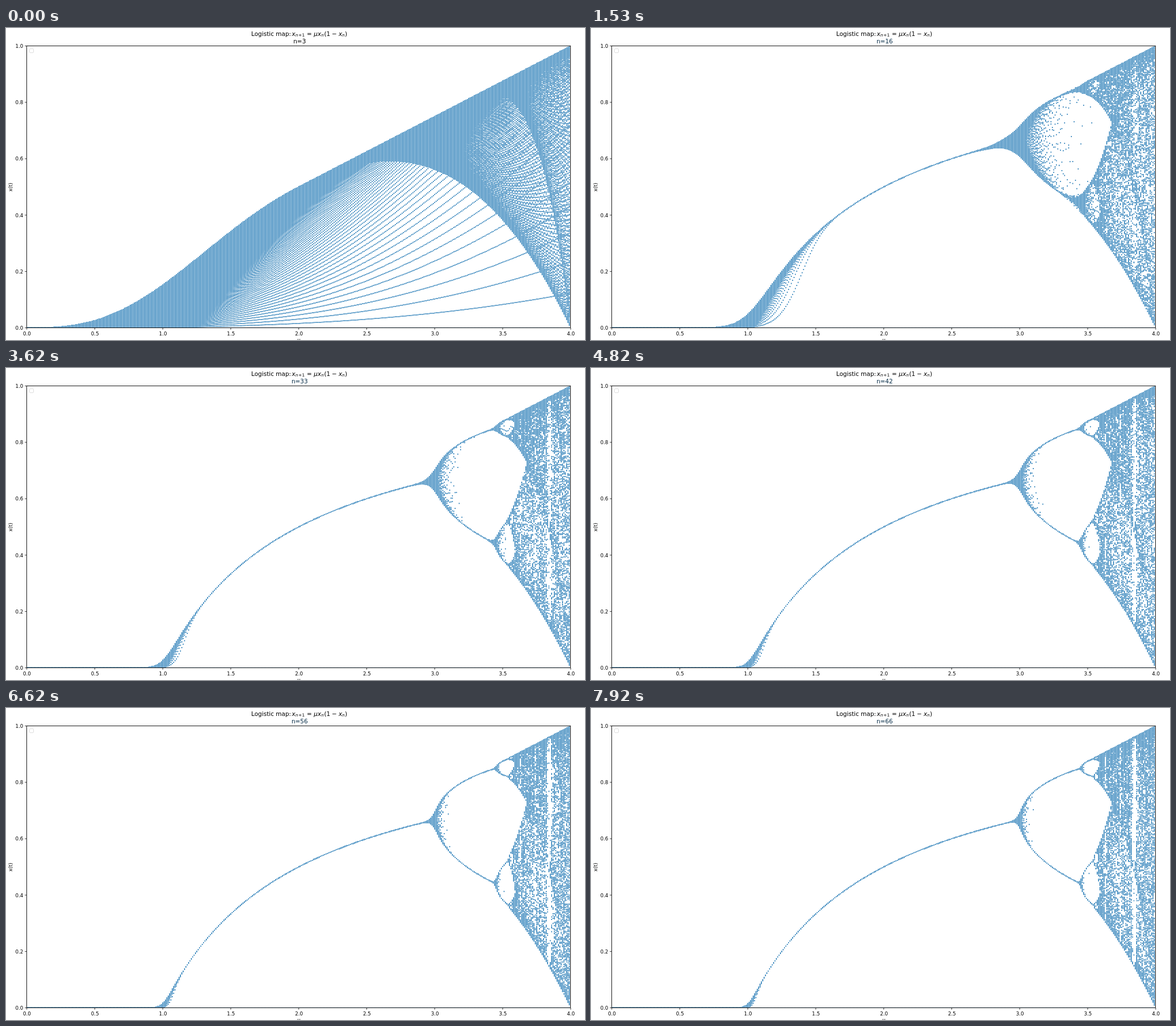
These frames come from a looping animation (1020 by 549 pixels, 8000 ms). An HTML page with a canvas:

```html
<!DOCTYPE html>
<html lang="en">
<head>
<meta charset="utf-8">
<title>Logistic map</title>
<style>
  html, body { margin: 0; width: 1020px; height: 549px; overflow: hidden; background: #fff; }
  canvas, svg { position: absolute; left: 0; top: 0; }
  text { font-family: "DejaVu Sans", sans-serif; font-size: 8.7px; }
  .title { font-size: 10.5px; }
  .it { font-style: oblique; }
  .sub { font-size: 7.4px; }
</style>
</head>
<body>
<canvas id="plot" width="1020" height="549"></canvas>
<svg id="axes" width="1020" height="549" viewBox="0 0 1020 549">
  <rect x="36.5" y="31.5" width="958" height="496" fill="none" stroke="#000" stroke-width=".9"/>
  <rect x="41.5" y="36.5" width="7" height="7" rx="1.5" fill="#fff" fill-opacity=".8" stroke="#d6d6d6" stroke-width=".8"/>
</svg>
<script>
const W = 1020, H = 549, LOOP = 8000;
const LEFT = 36.7, RIGHT = 994.8, TOP = 31.6, BOTTOM = 527.6;
const MUS = 400, SEEDS = 500, HALF = 0.75;
const svg = document.getElementById('axes');
const ctx = document.getElementById('plot').getContext('2d');

// Axis furniture and labels
function add(tag, attrs, content = '') {
  const el = document.createElementNS('http://www.w3.org/2000/svg', tag);
  for (const key in attrs) el.setAttribute(key, attrs[key]);
  el.textContent = content;
  svg.appendChild(el);
  return el;
}
const label = (x, y, content, anchor = 'start', cls = '') =>
  add('text', { x, y, 'text-anchor': anchor, class: cls }, content);
const tick = d => add('path', { d, stroke: '#000', 'stroke-width': 0.8 });

for (let i = 0; i <= 8; i++) {
  const x = LEFT + (RIGHT - LEFT) * i / 8;
  tick(`M${x} 528v2.8`);
  label(x + 0.3, 541.2, (i / 2).toFixed(1), 'middle');
}
for (let i = 0; i <= 5; i++) {
  const y = BOTTOM - (BOTTOM - TOP) * i / 5;
  tick(`M36 ${y}h-2.8`);
  label(30.3, y + 3.4, (i / 5).toFixed(1), 'end');
}
label(515.8, 552.3, 'μ', 'middle', 'it');
label(0, 0, 'x(t)', 'middle').setAttribute('transform', 'translate(11 280) rotate(-90)');

label(432, 13.7, 'Logistic map:', 'start', 'title');
const formula = [
  [503.6, 'x', 'it'], [530, '='], [542.3, 'μ', 'it'], [549, 'x', 'it'], [560.4, '('],
  [564.5, '1'], [574, '−'], [586, 'x', 'it'], [597, ')']
];
for (const [x, s, cls = ''] of formula) label(x, 13.7, s, 'start', 'title ' + cls);
for (const x of [509.8, 555.2, 592]) label(x, 15.4, 'n', 'start', 'sub it');
label(515, 15.4, '+', 'start', 'sub');
label(521.5, 15.4, '1', 'start', 'sub');
const counter = label(517.3, 26.8, '', 'middle', 'title');

// Bursts of steps: first time, last time, number of steps
const bursts = [
  [0, 0, 1], [100, 210, 2], [410, 910, 6], [1110, 1530, 5], [1730, 2030, 4], [2230, 2520, 4],
  [2710, 3120, 5], [3320, 3620, 4], [3800, 4120, 4], [4320, 4620, 4], [4820, 5020, 3],
  [5220, 5520, 4], [5730, 6010, 4], [6220, 6400, 3], [6620, 6920, 4], [7120, 7200, 2],
  [7420, 7720, 4], [7920, 7920, 1]
];
const times = bursts.flatMap(([a, b, k]) =>
  Array.from({ length: k }, (_, i) => k > 1 ? Math.round((a + (b - a) * i / (k - 1)) / 10) * 10 : a));

// Orbits for every pair of growth rate and seed
const orbit = new Float64Array(MUS * SEEDS);
let age = Infinity;
function iterateTo(n) {
  if (n < age) {
    for (let i = 0; i < orbit.length; i++) orbit[i] = (i % SEEDS) * 0.002;
    age = 0;
  }
  for (; age < n; age++) {
    for (let m = 0, i = 0; m < MUS; m++) {
      const mu = m * 0.01;
      for (let j = 0; j < SEEDS; j++, i++) orbit[i] = mu * orbit[i] * (1 - orbit[i]);
    }
  }
}

// Share of pixel p covered by a dot centred at c
const cover = (p, c) => Math.max(0, Math.min(p + 1, c + HALF) - Math.max(p, c - HALF));

const image = ctx.createImageData(W, H);
const clear = new Float32Array(W * H);
const column = new Float32Array(H);

function plot() {
  clear.fill(1);
  for (let m = 0; m < MUS; m++) {
    column.fill(0);
    for (let j = 0; j < SEEDS; j++) {
      const y = BOTTOM - orbit[m * SEEDS + j] * (BOTTOM - TOP);
      const row = Math.floor(y - HALF);
      for (let p = row; p < row + 3; p++) column[p] += cover(p, y);
    }
    const x = LEFT + m * 0.01 * (RIGHT - LEFT) / 4;
    const first = Math.floor(x - HALF);
    for (let p = Math.max(36, first); p < first + 3; p++) {
      const share = cover(p, x);
      for (let r = 31; r < 528; r++) clear[r * W + p] *= 1 - share * Math.min(1, column[r]);
    }
  }
  const px = image.data;
  for (let i = 0; i < clear.length; i++) {
    px[4 * i] = 31;
    px[4 * i + 1] = 119;
    px[4 * i + 2] = 180;
    px[4 * i + 3] = 255 * (1 - clear[i]);
  }
  ctx.putImageData(image, 0, 0);
}

let shown = 0;
function frame() {
  const t = performance.now() % LOOP;
  const n = 2 + times.filter(s => s <= t).length;
  if (n !== shown) {
    shown = n;
    iterateTo(n);
    plot();
    counter.textContent = 'n=' + n;
    counter.setAttribute('fill', n > 3 ? '#0a2f49' : '#000');
  }
  requestAnimationFrame(frame);
}
frame();
</script>
</body>
</html>
```
